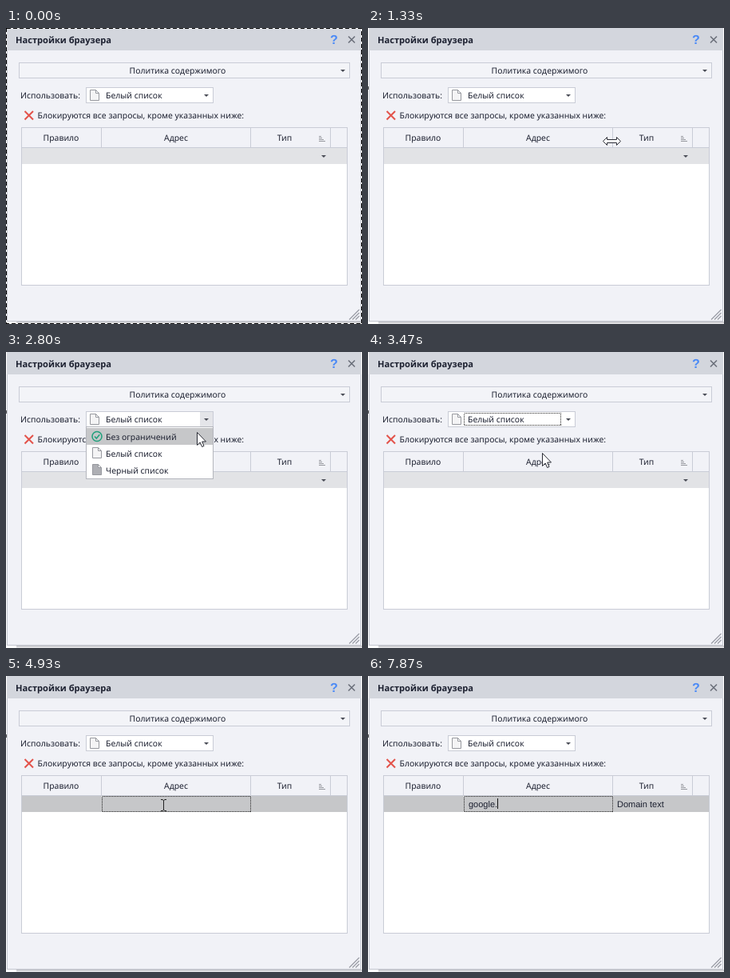
Animation, 446 px wide and 370 px high, one loop 8 s. Source, as an HTML page:

```html
<!DOCTYPE html>
<html lang="ru">
<head>
<meta charset="utf-8">
<title>Настройки браузера</title>
<style>
  html, body { margin: 0; width: 446px; height: 370px; overflow: hidden; background: #fff; }
  svg { display: block; }
  text { font: 10.4px "Noto Sans", "Open Sans", sans-serif; fill: #1c2030; text-rendering: geometricPrecision; }
  .mid { text-anchor: middle; }
  .title { font: bold 11.1px "Noto Sans", "Open Sans", sans-serif; }
  .entry { font: 11px "Liberation Sans", Arial, sans-serif; }
  .help { font: bold 16px "Liberation Sans", Arial, sans-serif; fill: #4a8af6; }
  .box { stroke: #c9ccd6; }
  .line { fill: none; stroke: #c9ccd6; }
  .crisp { shape-rendering: crispEdges; }
  .dots { fill: none; stroke: #222; stroke-dasharray: 1 1; shape-rendering: crispEdges; }
  .pointer { fill: #fff; stroke: #2b2d36; }
</style>
</head>
<body>
<svg width="446" height="370" viewBox="0 0 446 370">
  <defs>
    <path id="page" d="M.5 .5H7.5L11.5 4.5V13.5H.5ZM7.5 .5V4.5H11.5" stroke="#97999f"/>
    <path id="down" d="M-3 -1H3L0 2Z" fill="#4a4d57"/>
    <linearGradient id="shade" x2="0" y2="1">
      <stop stop-color="#bfc0c4"/><stop offset="1" stop-color="#ececee"/>
    </linearGradient>
  </defs>

  <!-- window -->
  <rect x="13" y="367" width="433" height="3" fill="url(#shade)"/>
  <path class="crisp" d="M0 73h1v4h-1z" fill="#555"/>
  <g class="crisp">
    <rect x="1.5" y="0.5" width="443" height="366" fill="#f1f2f7" stroke="#c3c6cf"/>
    <rect x="1" y="0" width="444" height="28" fill="#d3d6dd"/>
  </g>
  <text class="title" x="12" y="19">Настройки браузера</text>
  <text class="help mid" x="411" y="20">?</text>
  <path d="M429 10.500L437 18.500M437 10.500L429 18.500" stroke="#6b707b" stroke-width="1.600"/>
  <path d="M430 364.500L442.500 352M434 364.500L442.500 356M438 364.500L442.500 360" stroke="#9a9da6" stroke-width="1.200"/>

  <!-- selectors -->
  <g class="crisp">
    <rect class="box" x="16.5" y="43.5" width="414" height="19" fill="#f3f4f8"/>
    <rect class="box" x="100.5" y="74.5" width="159" height="19" fill="#fff"/>
    <path id="hover" d="M243 75h16v18h-16z" fill="#e4e5e9"/>
  </g>
  <text class="mid" x="215" y="57">Политика содержимого</text>
  <use href="#down" x="422" y="53"/>
  <text x="18" y="88">Использовать:</text>
  <use href="#page" x="105" y="77" fill="#f4f4f5"/>
  <text x="125" y="88">Белый список</text>
  <use href="#down" x="251" y="84"/>
  <rect id="comboFocus" class="dots" x="120.5" y="76.5" width="121" height="15"/>
  <path d="M23.500 104L34 114.500M34 104L23.500 114.500" stroke="#e3524a" stroke-width="2"/>
  <text x="39.500" y="113">Блокируются все запросы, кроме указанных ниже:</text>

  <!-- table -->
  <g class="crisp">
    <rect class="box" x="19.5" y="124.5" width="408" height="197" fill="#fff"/>
    <rect x="20" y="125" width="407" height="24" fill="#f1f2f7"/>
    <path class="line" d="M20 149.500H427M119.500 125V149M306.500 125V149M406.500 125V149"/>
    <rect id="row" x="20" y="150" width="407" height="20"/>
    <path d="M392 135.500h3M392 137.500h4M392 139.500h6M392 141.500h8" stroke="#97999f"/>
  </g>
  <text class="mid" x="69" y="141">Правило</text>
  <text class="mid" x="213" y="141">Адрес</text>
  <text class="mid" x="349" y="141">Тип</text>
  <use id="rowArrow" href="#down" x="398" y="160"/>
  <g id="editor">
    <rect class="dots" x="120.5" y="150.5" width="186" height="19"/>
    <text id="typed" class="entry" x="126" y="164"></text>
    <text id="kind" class="entry" x="312" y="164">Domain text</text>
    <rect id="caret" class="crisp" y="153" width="1" height="13" fill="#111"/>
  </g>

  <!-- drop-down list -->
  <g id="popup">
    <rect class="crisp" x="100.5" y="93.5" width="159" height="65" fill="#fff" stroke="#b4b6bd"/>
    <rect id="pick" class="crisp" x="101" width="158" height="21" fill="#c6c7c9"/>
    <circle cx="114" cy="105.500" r="6" fill="none" stroke="#20a07c" stroke-width="1.500"/>
    <path d="M111 105.500L113.300 108L117.300 103.300" fill="none" stroke="#20a07c" stroke-width="1.500"/>
    <use href="#page" x="108" y="119" fill="#f4f4f5"/>
    <use href="#page" x="108" y="140" fill="#aeafb4"/>
    <text x="125" y="110">Без ограничений</text>
    <text x="125" y="131">Белый список</text>
    <text x="125" y="152">Черный список</text>
  </g>

  <g id="cursor">
    <path id="arrow" class="pointer" d="M.5 .5V16.500L4.200 13L6.600 18.500L9 17.500L6.700 12H11.500Z"/>
    <path id="resize" class="pointer" d="M-10.500 .5L-5.500 -4.500V-1.500H6.500V-4.500L11.500 .5L6.500 5.500V2.500H-5.500V5.500Z"/>
    <path id="beam" d="M-3 -6.500H-1L.5 -5.500L2 -6.500H4M.5 -5.500V6.500M-3 7.500H-1L.5 6.500L2 7.500H4" fill="none" stroke="#222"/>
  </g>

  <!-- selection border -->
  <g id="frame" class="crisp" fill="none">
    <rect x="0.5" y="0.5" width="445" height="369" stroke="#fff"/>
    <rect id="ants" x="0.5" y="0.5" width="445" height="369" stroke="#000" stroke-dasharray="5 3"/>
  </g>
</svg>
<script>
const $ = id => document.getElementById(id);
const show = (id, on) => $(id).style.display = on ? "" : "none";
const LOOP = 8000, RATE = 15;

// cursor path: step, x, y
const path = [
  [6, 446, 368], [17, 310, 163], [18, 307, 149], [19, 307, 149], [20, 305, 141],
  [27, 251, 81], [38, 251, 81], [42, 239, 100], [48, 218, 126], [55, 218, 126],
  [59, 197, 152], [60, 197, 152], [65, 197, 161]
];
// step of each key press and the caret position after it
const WORD = "google.", CLICK = 66;
const keys = [
  [CLICK, 126], [93, 132], [98, 138], [101, 144], [105, 150], [107, 152], [109, 158], [118, 162]
];

function cursorAt(n) {
  const i = path.findIndex(p => p[0] >= n);
  if (i < 0) return path[path.length - 1].slice(1);
  if (i === 0) return path[0].slice(1);
  const [a, ax, ay] = path[i - 1], [b, bx, by] = path[i];
  const k = (n - a) / (b - a);
  return [Math.round(ax + (bx - ax) * k), Math.round(ay + (by - ay) * k)];
}

function draw(t) {
  const n = Math.floor((t + 4) * RATE / 1000);
  const between = (a, b) => n >= a && n < b;
  const [x, y] = cursorAt(n);
  const editing = n >= CLICK;

  show("frame", n < 3);
  $("ants").setAttribute("stroke-dashoffset", n < 2 ? 0 : -2);

  show("hover", between(26, 52));
  show("popup", between(34, 52));
  $("pick").setAttribute("y", y > 94 && y < 116 ? 95 : 116);
  show("comboFocus", between(52, CLICK));

  $("row").setAttribute("fill", editing ? "#c6c7c9" : "#e2e3e6");
  show("rowArrow", !editing);
  show("editor", editing);
  show("kind", n >= 93);
  if (editing) {
    const pressed = keys.filter(k => k[0] <= n).length - 1;
    const [last, caretX] = keys[pressed];
    $("typed").textContent = WORD.slice(0, pressed);
    $("caret").setAttribute("x", caretX);
    show("caret", (n - last >> 3) % 2 === 0);
  }

  const shape = between(18, 21) ? "resize" : n > CLICK ? "beam" : "arrow";
  for (const id of ["arrow", "resize", "beam"]) show(id, id === shape);
  show("cursor", between(7, 93));
  $("cursor").setAttribute("transform", `translate(${x} ${y})`);
}

const start = performance.now();
function tick() {
  draw((performance.now() - start) % LOOP);
  requestAnimationFrame(tick);
}
tick();
</script>
</body>
</html>
```
